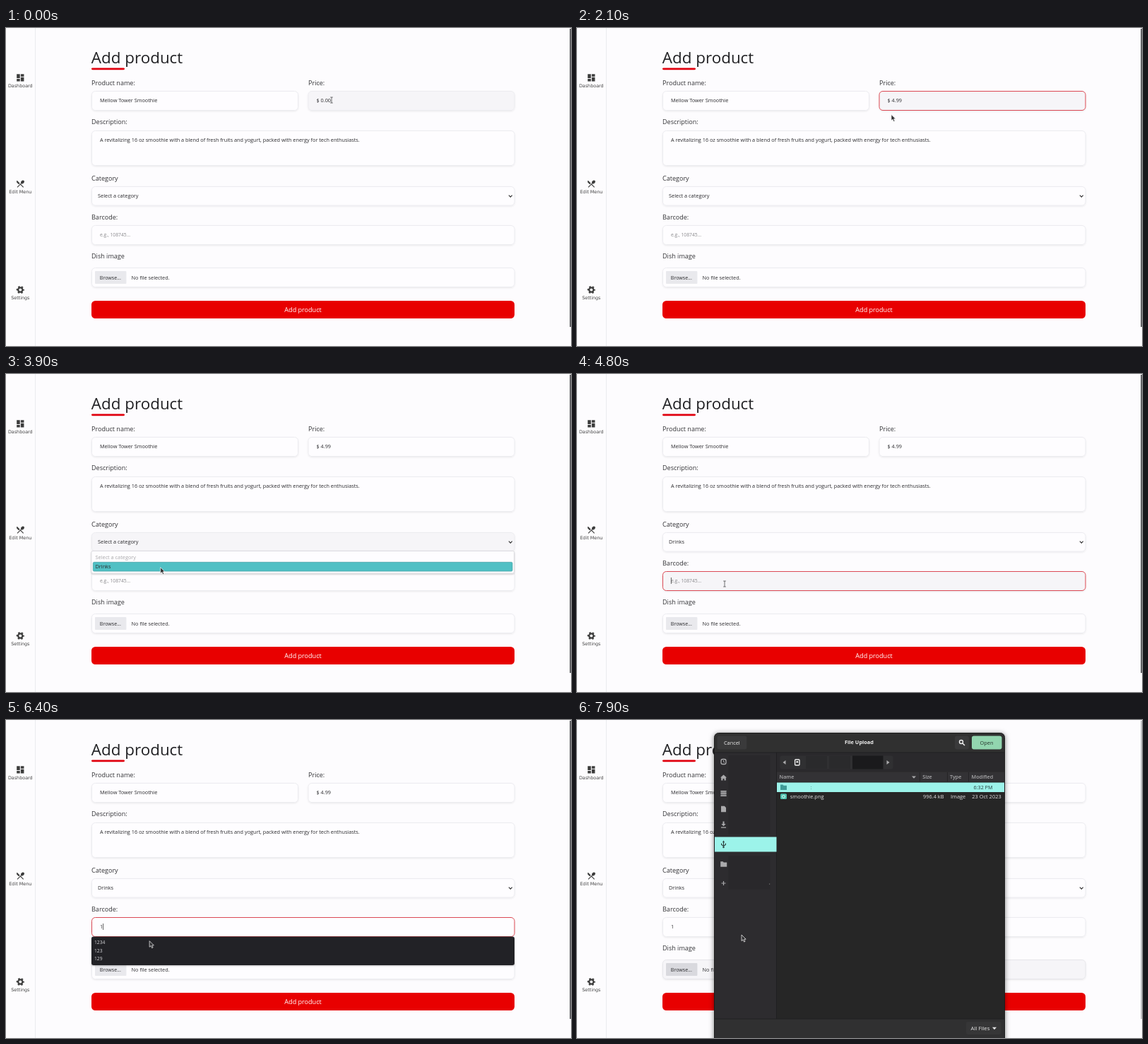
These frames come from a looping animation (800 by 450 pixels, 8 s). An HTML page:

```html
<!DOCTYPE html>
<html lang="en">
<head>
<meta charset="utf-8">
<title>Add product</title>
<style>
  html, body { margin: 0; width: 100%; height: 100%; overflow: hidden; background: #fdfcfe; }
  svg { display: block; width: 100vw; height: 100vh; font-family: "Open Sans", "Noto Sans", sans-serif; }
  text { white-space: pre; }
  .side { font-family: "DejaVu Sans", sans-serif; font-size: 6.4px; fill: #444; text-anchor: middle; }
</style>
</head>
<body>
<svg id="stage" viewBox="0 0 800 450" xmlns="http://www.w3.org/2000/svg"></svg>
<script>
const LOOP = 8000, STEP = 100;
const INK = '#2b2b2e', HOVER = [246, 245, 248], PAPER = [254, 253, 255];

const rect = (x, y, w, h, fill, r = 0, more = '') =>
  `<rect x="${x}" y="${y}" width="${w}" height="${h}" rx="${r}" fill="${fill}" ${more}/>`;
const text = (x, y, str, size = 7.3, fill = INK, more = '') =>
  `<text x="${x}" y="${y}" font-size="${size}" fill="${fill}" ${more}>${str}</text>`;
const path = (d, fill = 'none', more = '') => `<path d="${d}" fill="${fill}" ${more}/>`;
const line = (d, color, w = 1) => path(d, 'none', `stroke="${color}" stroke-width="${w}"`);
const label = (y, str, x = 121) => text(x, y, str, 9.05, '#333336');
const field = (id, x, y, w, h) =>
  rect(x, y, w, h, '#fefdff', 5, `id="${id}" stroke="#ececf0" stroke-width="1" filter="url(#soft)"`);
const middle = 'text-anchor="middle"';

function sidebar() {
  const ink = '#3c3c3c';
  const icon = (y, body) => `<g transform="translate(20.3 ${y}) scale(.57) translate(-12 -12)">${body}</g>`;
  return line('M41.5 0V450', '#ebebef') +
    icon(70.4, path('M3 13h8V3H3zm0 8h8v-6H3zm10 0h8V11h-8zm0-18v6h8V3z', ink)) +
    icon(220.5, path('M8.1 13.3l2.8-2.8-7-7c-1.6 1.6-1.6 4.1 0 5.7zm6.8-1.8c1.5.7 3.7.2 5.3-1.4 1.9-1.9 2.3-4.6.8-6.1-1.5-1.5-4.2-1.1-6.1.8-1.6 1.6-2.1 3.7-1.4 5.3L3.7 19.9l1.4 1.4 6.9-6.9 6.9 6.9 1.4-1.4-6.9-6.9z', ink)) +
    icon(370.4, `<g fill="none" stroke="${ink}"><circle cx="12" cy="12" r="5.5" stroke-width="4"/>
      <circle cx="12" cy="12" r="8.2" stroke-width="3.2" pathLength="12" stroke-dasharray="1 1" stroke-dashoffset=".5"/></g>`) +
    [['Dashboard', 84.1], ['Edit Menu', 233.9], ['Settings', 383.6]]
      .map(([s, y]) => `<text class="side" x="20.3" y="${y}">${s}</text>`).join('');
}

function form() {
  return text(120.8, 50, 'Add product', 22.4, '#212124', 'font-weight="500"') +
    rect(121, 56.4, 47, 2.8, '#e0000d', 1.4) +
    label(81, 'Product name:') + label(81, 'Price:', 428) + label(136, 'Description:') +
    label(215.6, 'Category') + label(270.8, 'Barcode:') + label(326.3, 'Dish image') +
    field('name', 121.5, 89.5, 292, 27) + text(133, 105.4, 'Mellow Tower Smoothie') +
    field('price', 428, 89.5, 292, 27) +
    rect(445.3, 98, 15.4, 10, '#3584e4', 0, 'id="selection"') + text(439.5, 105.4, '', 7.3, INK, 'id="priceText"') +
    field('about', 121.5, 145.5, 598.5, 49) +
    text(133, 161, 'A revitalizing 16 oz smoothie with a blend of fresh fruits and yogurt, packed with energy for tech enthusiasts.') +
    field('category', 121.5, 224.5, 598.5, 26.5) + text(130, 240.3, '', 7.35, INK, 'id="categoryText"') +
    line('M711.9 236.7l2.4 2.4 2.4-2.4', '#333', 1.2) +
    field('code', 121.5, 279.5, 598.5, 27) + text(133, 295.3, '', 7, INK, 'id="codeText"') +
    field('file', 121.5, 339.5, 598.5, 27) + rect(126, 344, 44.4, 18, '#e9e9ed', 1, 'id="browse"') +
    text(132.8, 355.5, 'Browse...', 7.1) + text(177.6, 355.5, 'No file selected.') +
    rect(121, 386, 599, 25, '#e80000', 5.5) + text(420.5, 401.5, 'Add product', 9.05, '#fff', middle) +
    rect(798.2, 1, 1.8, 422, '#5a5a5e', 0, 'id="bar"');
}

function menus() {
  return `<g id="options">${rect(121, 250.5, 598.5, 31.5, '#fefdff', 2, 'stroke="#d4d4d8" stroke-width=".7" filter="url(#drop)"')}
    ${text(126.5, 261.8, 'Select a category', 7.35, '#a9a9ab')}
    ${rect(123.3, 266.3, 593.7, 12.8, '#50c0c4', 1.5, 'stroke="#3f9fa3" stroke-width=".7"')}
    ${text(126.5, 275.3, 'Drinks', 7.3)}</g>
    <g id="hints">${rect(121, 306.5, 599, 40.5, '#232226', 3, 'filter="url(#drop)"')}
    ${['1234', '123', '129'].map((s, i) => text(125, 317 + i * 11.7, s, 6.7, '#d6d6d9')).join('')}</g>`;
}

function dialog() {
  const gray = '#aaaaac', pale = '#ececec', mint = '#9cf3ea', dark = '#262528';
  const head = (x, s) => text(x, 83.4, s, 7.2, gray, 'font-weight="600"');
  const folder = (x, y, c) => path(`M${x} ${y}h3.5l1 1.2h4.5v6.3h-9z`, c);
  return `<g id="dialog">` +
    rect(194.5, 18.5, 411, 450, dark, 6, 'stroke="#1c1c1e" stroke-width="1" filter="url(#shade)"') +
    path('M195 46V24a5 5 0 0 1 5-5H600a5 5 0 0 1 5 5V46z', '#303030') +
    rect(195, 46, 87.5, 377, '#2d2c2f') + rect(283, 46, 322, 27.5, '#2a292c') +
    rect(283, 73.5, 322, 14, '#333235') + rect(195, 423, 410, 27, '#303031') +
    line('M195 46H605M282.5 46V423M195 423H605', '#1e1e20', .8) +
    rect(198.5, 22.5, 41.8, 19, '#3a3a3b', 3) + text(219.3, 34.5, 'Cancel', 7.4, pale, middle) +
    text(399.5, 34.4, 'File Upload', 7.35, '#f4f4f4', middle + ' font-weight="700"') +
    rect(535, 22.5, 20, 19, '#3a3a3b', 3) +
    `<circle cx="544" cy="31" r="2.5" fill="none" stroke="#eee" stroke-width="1.4"/>` + line('M546 33l3 3', '#eee', 1.5) +
    rect(559, 22.5, 42.5, 19, '#92d5af', 3) + text(580, 34.5, 'Open', 7.4, '#26352d', middle) +
    // path bar
    rect(287.5, 50.5, 160, 19, '#303032', 3) + rect(324, 51, 30, 18, '#2a2a2c') + rect(357, 51, 30, 18, '#2a2a2c') +
    rect(390, 50.5, 43.5, 19, '#1a1a1c') + path('M295.5 57v6l-4-3z', gray) + path('M438.5 57v6l4-3z', gray) +
    rect(308.6, 56, 6.4, 8, 'none', 1, 'stroke="#eee" stroke-width="1.4"') + `<circle cx="311.8" cy="59.3" r="1.4" fill="#eee"/>` +
    // columns
    head(286.5, 'Name') + head(489.2, 'Size') + head(528, 'Type') + head(558.5, 'Modified') +
    path('M474 79.5h6l-3 3.2z', gray) + line('M485.5 74V87M524.5 74V87M554.5 74V87', '#222124', .8) +
    rect(283, 88.5, 322, 13.5, mint) + folder(288, 91.5, '#3f9c98') + text(330.5, 98, ':', 7.2, '#4f807c') +
    text(561.5, 97.8, '6:32 PM', 7.2, '#26403e') +
    rect(288, 104.3, 9, 7.8, '#4fc3b0', 1.5) + `<circle cx="292.5" cy="108.4" r="1.9" fill="none" stroke="#e8fffb"/>` +
    text(301.7, 111.3, 'smoothie.png', 7.45, '#e2e2e3') + text(490, 111.3, '996.4 kB', 7.4, '#e2e2e3') +
    text(529, 111.3, 'Image', 7.4, '#e2e2e3') + text(559.3, 111.3, '23 Oct 2023', 7.45, '#e2e2e3') +
    // places
    rect(214.5, 50, 59, 112, '#29282b') + rect(214.5, 192, 59, 48, '#29282b') + rect(195, 165.5, 87.5, 21, mint) +
    rect(204, 55.5, 7, 7, 'none', 2.2, `stroke="${gray}" stroke-width="1.3"`) + line('M207.5 57v2.2l1.6 1', gray) +
    path('M207.5 77.5l4.5 4h-1.2v4h-2.3v-2.6h-2v2.6h-2.3v-4H203z', gray) +
    rect(203.5, 100, 8, 8, '#77777a') + line('M203.5 100.7h8M203.5 103.7h8M203.5 107.3h8', gray, 1.2) +
    path('M204 121.8h4.8l2.2 2.2v6.3h-7z', gray) +
    path('M206.5 143.5h2v3.5h2.2l-3.2 3.2-3.2-3.2h2.2zM204 151.5h7v1.3h-7z', gray) +
    line('M207.5 171.5v8.5M204.6 174.5v2l2.9 1.8 2.9-1.8v-2', '#2c3f3d', 1.1) +
    path('M205.9 173.2l1.6-2.6 1.6 2.6z', '#2c3f3d') + `<circle cx="207.5" cy="180" r="1.2" fill="#2c3f3d"/>` +
    folder(203.2, 200.2, gray) + line('M204.5 231h6M207.5 228v6', gray, 1.2) + rect(272, 231.5, 1.2, 1.2, '#777') +
    // footer
    rect(551, 427, 49.5, 18, '#363637', 3) + text(557.5, 438.9, 'All Files', 7.8, '#e6e6e6') +
    path('M588 434.8h6l-3 3.4z', '#e6e6e6') + '</g>';
}

function pointers() {
  const beam = 'M-1.8-4h3.6M0-4V4M-1.8 4h3.6';
  return `<g id="pointer">
    <g id="beam">${line(beam, '#fff', 1.9)}${line(beam, '#55555a', .9)}</g>
    <g id="arrow">${path('M0 0V8.6L2 6.8 3.5 10 5 9.3 3.6 6.2H6.2z', '#2e2e30', 'stroke="#fff" stroke-width=".7"')}</g>
    <g id="hand">${path('M-.9 0a.9.9 0 0 1 1.8 0V3.2L5 4.2Q5.6 7 4.4 9.2H-.2L-2.8 6.2Q-2.9 5-1 5.8z', '#2e2e30', 'stroke="#fff" stroke-width=".6"')}</g></g>`;
}

const stage = document.getElementById('stage');
stage.innerHTML = `<defs>
  <filter id="soft" x="-5%" y="-30%" width="110%" height="170%"><feDropShadow dx="0" dy="1" stdDeviation="1.3" flood-color="#000" flood-opacity=".08"/></filter>
  <filter id="drop" x="-5%" y="-30%" width="110%" height="170%"><feDropShadow dx="0" dy="1" stdDeviation="1.2" flood-color="#000" flood-opacity=".25"/></filter>
  <filter id="shade" x="-5%" y="-5%" width="110%" height="110%"><feDropShadow dx="0" dy="1" stdDeviation="3.5" flood-color="#000" flood-opacity=".5"/></filter>
  </defs>` + rect(0, 0, 800, 450, '#fdfcfe') + sidebar() + form() + line('M0 0V9', '#222', .7).replace('<path', '<path id="caret"') +
  menus() + dialog() + pointers();

const el = {};
stage.querySelectorAll('[id]').forEach(n => el[n.id] = n);
const set = (n, key, value) => n.setAttribute(key, value);
const show = (n, on) => set(n, 'visibility', on ? 'visible' : 'hidden');
const within = (t, a, b) => t >= a && t < b;
const clamp = v => Math.min(1, Math.max(0, v));

// Pointer stops: time, x, y
const stops = [
  [0, 461, 102], [300, 461, 103], [800, 445, 103], [2000, 445, 103], [2100, 445, 122.5],
  [2600, 231, 239], [2800, 230, 240], [3300, 219.8, 277.6], [3900, 218.7, 273.6], [4100, 218.7, 273.6],
  [4600, 210, 294], [4800, 209, 297], [5200, 209, 297], [5800, 209.3, 303], [6200, 210, 305],
  [7000, 166, 354], [7200, 163.5, 356], [7600, 163.5, 356], [7900, 233, 304]
];

function pointerAt(t) {
  const i = stops.findIndex(s => s[0] > t);
  if (i < 0) return stops[stops.length - 1].slice(1);
  const [t0, x0, y0] = stops[i - 1], [t1, x1, y1] = stops[i];
  const k = (t - t0) / (t1 - t0), e = k * k * (3 - 2 * k);
  return [x0 + (x1 - x0) * e, y0 + (y1 - y0) * e];
}

const shadeOf = k => `rgb(${PAPER.map((p, i) => Math.round(p + (HOVER[i] - p) * k))})`;
const hover = (t, a, b, fade = 200) => clamp((t - a) / fade) * clamp((b - t) / fade);

function style(n, k, focused) {
  set(n, 'fill', shadeOf(k));
  set(n, 'stroke', focused ? '#dc4a54' : '#ececf0');
}

function render(t) {
  const priceFocus = within(t, 300, 2700), codeFocus = within(t, 4800, 6600);
  const typed = [1000, 1200, 1500, 1600].filter(s => t >= s).length;
  el.priceText.textContent = '$ ' + (typed ? '4.99'.slice(0, typed) : '0.00');
  set(el.selection, 'x', Math.max(445.3, pointerAt(t)[0]));
  set(el.selection, 'width', 460.7 - Math.min(460.7, Math.max(445.3, pointerAt(t)[0])));
  set(el.selection, 'opacity', .45);
  show(el.selection, within(t, 300, 1000));
  style(el.price, hover(t, -300, 2300), priceFocus);

  el.categoryText.textContent = t < 4100 ? 'Select a category' : 'Drinks';
  style(el.category, hover(t, 2500, 4300), false);
  show(el.options, within(t, 2800, 4100));

  const filled = t >= 5200;
  el.codeText.textContent = filled ? '1' : 'e.g., 108745...';
  set(el.codeText, 'font-size', filled ? 7.3 : 6.75);
  set(el.codeText, 'fill', filled ? INK : '#8a8a8d');
  style(el.code, hover(t, 4400, 5500), codeFocus);
  show(el.hints, within(t, 5300, 6600));

  const onFile = t >= 6800;
  style(el.file, hover(t, 6800, 9000), false);
  if (onFile) set(el.file, 'stroke', '#e6e6ea');
  set(el.browse, 'fill', t >= 7000 ? '#d9d9de' : '#e9e9ed');

  const key = codeFocus ? (filled ? 5200 : 4800) : t >= 1600 ? 1600 : 1000;
  const lit = Math.floor((t - key) / 500) % 2 === 0;
  const owner = codeFocus ? el.codeText : el.priceText;
  const width = codeFocus && !filled ? 0 : owner.getComputedTextLength();
  set(el.caret, 'transform', `translate(${+owner.getAttribute('x') + width + .4} ${codeFocus ? 288 : 98})`);
  show(el.caret, lit && (codeFocus || priceFocus && t >= 1000));

  show(el.dialog, t >= 7700);
  set(el.bar, 'fill', t >= 7700 ? '#c2c2c5' : '#5a5a5e');

  const [x, y] = pointerAt(t);
  set(el.pointer, 'transform', `translate(${x} ${y})`);
  const beam = t < 2100 || within(t, 4500, 6300), hand = within(t, 7000, 7700);
  show(el.beam, beam);
  show(el.hand, hand);
  show(el.arrow, !beam && !hand);
}

const start = performance.now();
function tick() {
  const t = (performance.now() - start) % LOOP;
  render(Math.floor(t / STEP) * STEP);
  requestAnimationFrame(tick);
}
render(0);
tick();
</script>
</body>
</html>
```
